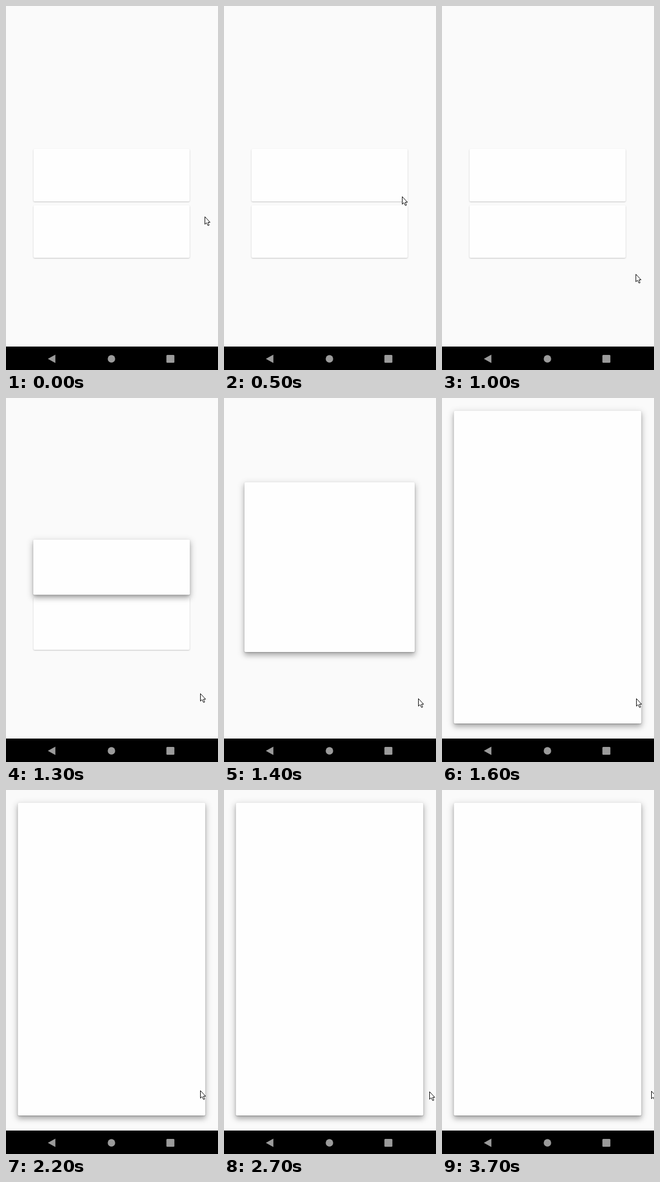
These frames come from a looping animation (380x652 px, 4 s). An HTML page:

```html
<!DOCTYPE html>
<html lang="en">
<head>
<meta charset="utf-8">
<title>Expanding card</title>
<style>
  html, body { margin: 0; width: 100%; height: 100%; overflow: hidden; background: #fafafa; }
  svg { display: block; width: 100vw; height: 100vh; }
  .face { fill: #fefefe; }
</style>
</head>
<body>
<svg viewBox="0 0 380 652">
  <rect width="380" height="652" fill="#fafafa"/>
  <g id="lower"></g>
  <g id="upper"></g>
  <rect y="610" width="380" height="42"/>
  <g fill="#9b9b9b">
    <path d="M75 632L88.5 624.5V639.5Z"/>
    <circle cx="189" cy="632" r="6.7"/>
    <rect x="287.5" y="625" width="14.3" height="14" rx="1.5"/>
  </g>
  <path id="cursor" d="M.5 .5V14L3.5 11.2L5.8 16H7.8V14.8L6 10.5H9.8Z"
        fill="#fff" stroke="#000" stroke-linejoin="round"/>
</svg>
<script>
const LOOP = 4000, STEP = 100;
const $ = id => document.getElementById(id);
const mix = (a, b, p) => a + (b - a) * p;

// Eased progress of a move between two times
function ease(t, from, to) {
  const u = Math.min(1, Math.max(0, (t - from) / (to - from)));
  return u * (1.5 - .5 * u);
}

// Card: centre, half width and half height
const WIDTH = 140, HEIGHT = 47, GAP = 101;
const MID = { x: 189.25, y: 303 };
const OPEN = { w: 168, h: 280 };
const LIFT_AT = 1300, OPENED = 1600;

const glides = [
  { from: 300, to: 700, x: 296, y: 320 },
  { from: 800, to: 1000, x: 347, y: 480 },
  { from: 1000, to: 1400, x: 348, y: 538 },
  { from: 2400, to: 2700, x: 368, y: 540 },
  { from: 2700, to: 2900, x: 375, y: 529 },
  { from: 3500, to: 3700, x: 375, y: 539 }
];

function add(parent, cls) {
  const el = document.createElementNS('http://www.w3.org/2000/svg', 'rect');
  el.setAttribute('class', cls);
  parent.append(el);
  return el;
}

function place(el, { x, y, w, h }, grow = 0, dy = 0, opacity = 1) {
  const attrs = {
    x: x - w - grow, y: y - h - grow + dy,
    width: 2 * (w + grow), height: 2 * (h + grow),
    rx: 2 + Math.max(0, grow), opacity
  };
  for (const k in attrs) el.setAttribute(k, attrs[k]);
}

function makeCard(id) {
  const [glow, key, edge] = [6, 4, 1].map(blur => {
    const el = add($(id), 'shadow');
    el.style.filter = `blur(${blur}px)`;
    return el;
  });
  const face = add($(id), 'face');
  return (box, lift) => {
    place(glow, box, 3, 4, .14 * lift);
    place(key, box, -1, 6, .2 * lift);
    place(edge, box, 0, 1, .22);
    place(face, box);
  };
}

const drawLower = makeCard('lower');
const drawUpper = makeCard('upper');
drawLower({ x: MID.x, y: MID.y + GAP, w: WIDTH, h: HEIGHT }, 0);

function pointerAt(t) {
  let x = 356, y = 377;
  for (const g of glides) {
    const p = ease(t, g.from, g.to);
    x = mix(x, g.x, p);
    y = mix(y, g.y, p);
  }
  return [Math.round(x), Math.round(y)];
}

function draw(ms) {
  const t = Math.floor(ms % LOOP / STEP) * STEP;
  const lift = t < LIFT_AT ? 0 : 1;
  const p = ease(t, LIFT_AT, OPENED);
  const w = mix(WIDTH + lift * .4, OPEN.w, p);
  const h = mix(HEIGHT + lift * 2.5, OPEN.h, p);
  drawUpper({ ...MID, w, h }, lift);
  $('cursor').setAttribute('transform', `translate(${pointerAt(t).join(' ')})`);
}

const start = performance.now();
function tick() {
  draw(performance.now() - start);
  requestAnimationFrame(tick);
}
tick();
</script>
</body>
</html>
```
